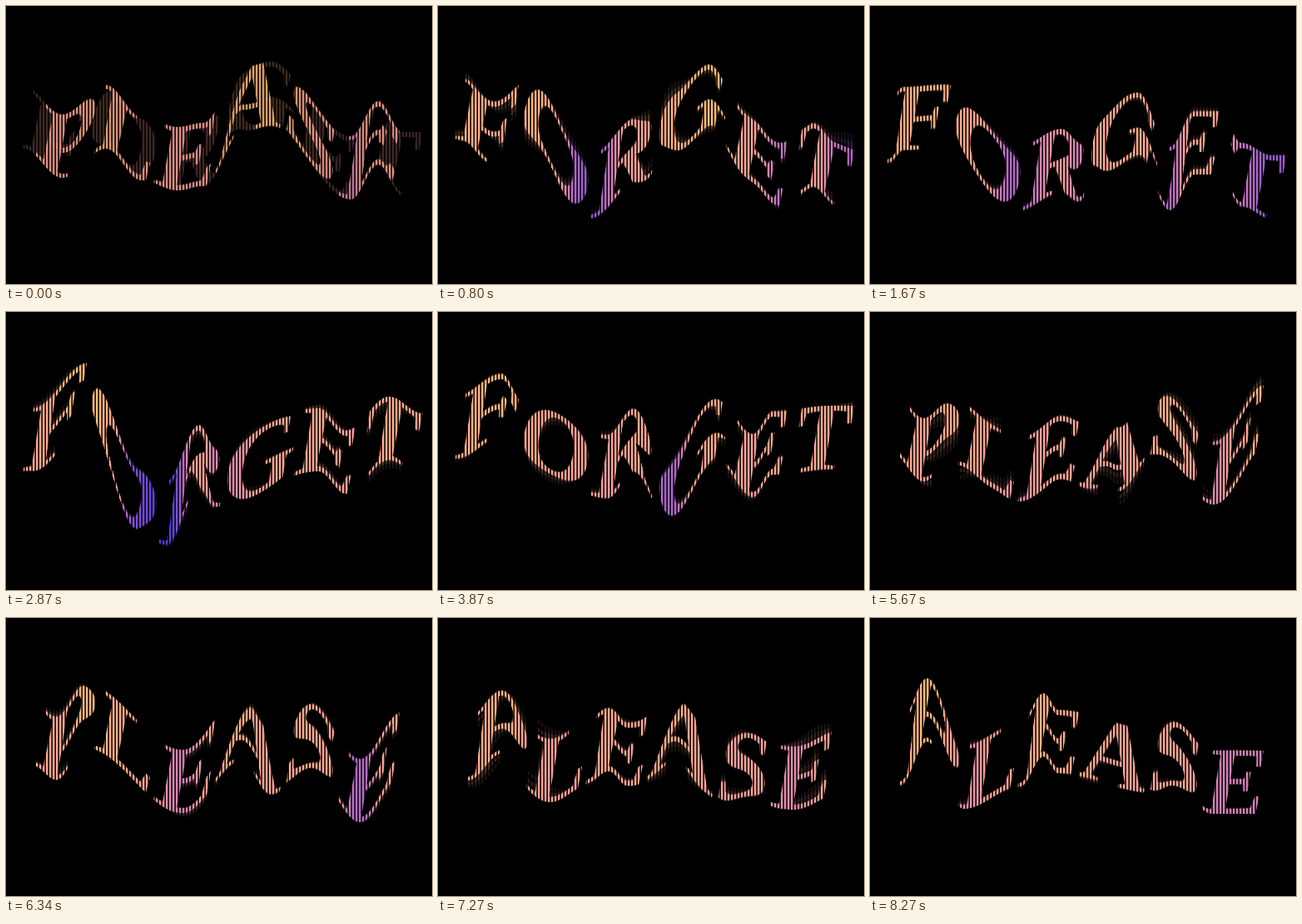
Animation of 512 by 335 pixels, one loop 8340 ms. Source, as an HTML page with a canvas:

```html
<!DOCTYPE html>
<html lang="en">
<head>
<meta charset="utf-8">
<title>Please forget</title>
<style>
html, body { margin: 0; width: 100%; height: 100%; overflow: hidden; background: #000; }
canvas { display: block; }
</style>
</head>
<body>
<canvas id="stage" width="512" height="335"></canvas>
<script>
const W = 512, H = 335, LOOP = 8340, STEPS = 125, BASE = 200;
const ctx = document.getElementById('stage').getContext('2d');
const clamp = (v, lo = 0, hi = 1) => Math.min(hi, Math.max(lo, v));
const mix = (a, b, u) => a + (b - a) * u;
const ease = u => (1 - Math.cos(Math.PI * u)) / 2;

// Crests and troughs of the baseline (x, y, x, y, ...) at chosen steps
const poses = [
  { at: 0, wave: [20,172, 67,207, 120,172, 162,210, 206,222, 236,217, 285,150, 318,144, 414,233, 447,191, 476,228] },
  { at: 25, wave: [22,189, 40,174, 90,171, 175,247, 230,224, 250,235, 275,202, 322,181, 360,246, 390,203, 420,203, 446,241, 482,256] },
  { at: 43, wave: [32,192, 98,138, 160,266, 192,280, 232,212, 250,234, 375,192, 408,219, 460,178, 500,198] },
  { at: 58, wave: [22,177, 76,151, 102,185, 203,224, 235,192, 275,250, 335,180, 378,223, 402,196, 470,189] },
  { at: 74, wave: [34,180, 130,222, 160,199, 215,212, 262,264, 290,248, 335,160, 440,187, 478,163] },
  { at: 95, wave: [32,178, 60,195, 94,156, 212,235, 282,172, 318,212, 365,180, 425,246, 475,190] },
  { at: 124, wave: [36,201, 68,149, 112,230, 180,203, 208,167, 226,187, 338,210, 362,201, 412,236] }
];

// Baseline height to column colour
const tints = [
  [145, 255, 188, 118],
  [185, 255, 168, 138],
  [222, 250, 160, 152],
  [244, 185, 108, 198],
  [278, 82, 58, 225]
];

function word(text, x) {
  const c = document.createElement('canvas');
  c.width = W;
  c.height = H;
  const g = c.getContext('2d');
  g.font = 'italic bold 117.3px "Liberation Serif", "Times New Roman", serif';
  g.fontKerning = 'none';
  g.fillStyle = '#fff';
  g.fillText(text, x, BASE);
  return c;
}
const please = word('PLEASE', 35), forget = word('FORGET', 20.8);

function waveAt(wave, x) {
  const last = wave.length - 2;
  if (x <= wave[0]) return wave[1];
  if (x >= wave[last]) return wave[last + 1];
  let i = 0;
  while (x > wave[i + 2]) i += 2;
  return mix(wave[i + 1], wave[i + 3], ease((x - wave[i]) / (wave[i + 2] - wave[i])));
}

function baseline(x, n) {
  let i = 0;
  while (i < poses.length - 2 && n >= poses[i + 1].at) i++;
  const a = poses[i], b = poses[i + 1];
  const u = clamp((n - a.at) / (b.at - a.at));
  const swell = 13 * Math.sin(Math.PI * u) *
    (Math.sin(x / 18 + n * 0.35) + Math.sin(x / 41 - n * 0.24));
  return mix(waveAt(a.wave, x), waveAt(b.wave, x), ease(u)) + swell;
}

function tint(y) {
  let i = 0;
  while (i < tints.length - 2 && y > tints[i + 1][0]) i++;
  const a = tints[i], b = tints[i + 1];
  const u = clamp((y - a[0]) / (b[0] - a[0]));
  return `rgb(${[1, 2, 3].map(k => Math.round(mix(a[k], b[k], u)))})`;
}

function column(x, y, forgetShare, alpha) {
  for (const [img, share] of [[please, 1 - forgetShare], [forget, forgetShare]]) {
    if (!share) continue;
    ctx.globalAlpha = alpha * share;
    ctx.drawImage(img, x, 0, 1, H, x, y - BASE, 1, H);
  }
}

function draw(n) {
  const share = clamp((n + 1) / 5) - clamp((n - 61) / 5);
  ctx.clearRect(0, 0, W, H);
  for (let x = 0; x < W; x++) {
    if (x % 4 === 3) continue;
    const light = x % 4 === 2 ? 0.45 : 1;
    const y = baseline(x, n);
    // fading trail, then the letters
    column(x, baseline(x, Math.max(0, n - 2)), share, 0.1 * light);
    column(x, baseline(x, Math.max(0, n - 1)), share, 0.2 * light);
    column(x, y, share, light);
    ctx.globalAlpha = 1;
    ctx.globalCompositeOperation = 'source-atop';
    ctx.fillStyle = tint(y);
    ctx.fillRect(x, 0, 1, H);
    ctx.globalCompositeOperation = 'source-over';
  }
}

const start = performance.now();
function tick() {
  const t = (performance.now() - start) % LOOP;
  draw(Math.min(STEPS - 1, Math.floor(t * STEPS / LOOP + 0.1)));
  requestAnimationFrame(tick);
}
tick();
</script>
</body>
</html>
```
